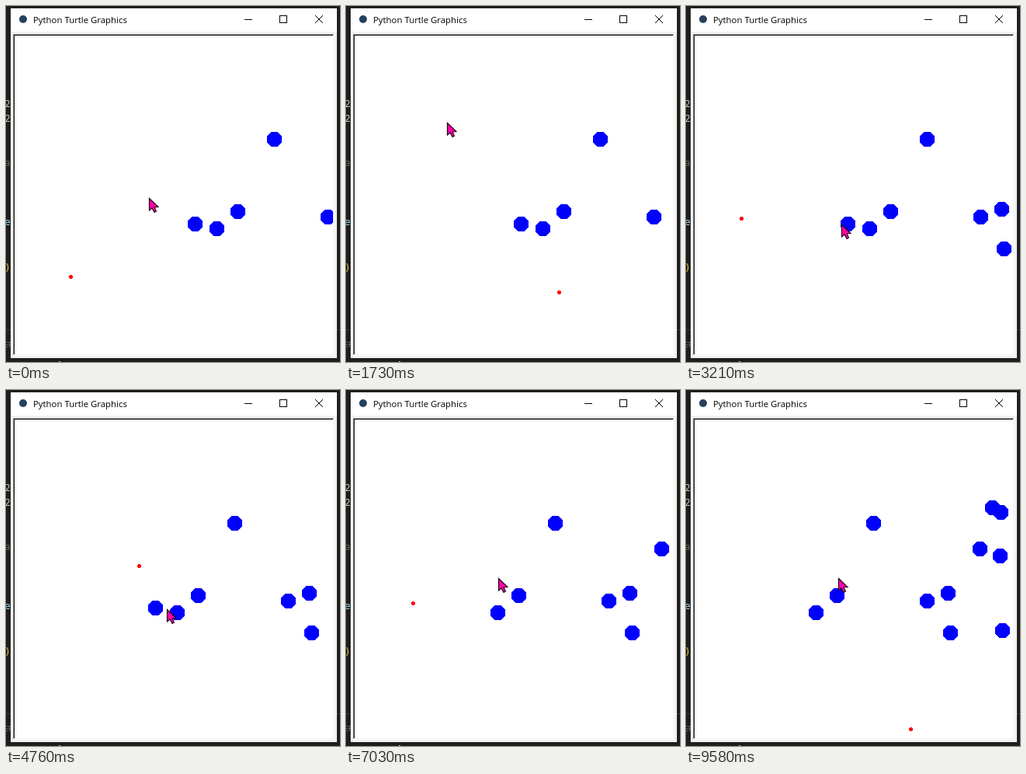
Recreate the animation shown at these times as an HTML page. Size 430 px wide and 458 px high, loop 9610 ms.

```html
<!DOCTYPE html>
<html lang="en">
<head>
<meta charset="utf-8">
<title>Cannon game</title>
<style>
  html, body { margin: 0; width: 100%; height: 100%; overflow: hidden; background: #1e1e1e; }
  svg { display: block; width: 430px; height: 458px; }
  .crisp { shape-rendering: crispEdges; }
  .code { font: 13px "Noto Sans Mono", monospace; }
  .panel { font: 9px "Open Sans", sans-serif; }
  .title { font: 11.4px "Open Sans", sans-serif; }
</style>
</head>
<body>
<svg viewBox="0 0 430 458">
  <defs>
    <clipPath id="field"><rect x="11" y="38" width="410" height="410"/></clipPath>
    <polygon id="target" points="-4,-9.5 4,-9.5 9.5,-4 9.5,4 4,9.5 -4,9.5 -9.5,4 -9.5,-4"
      transform="translate(.5 .5)" fill="#00f"/>
  </defs>

  <rect width="430" height="458" fill="#1e1e1e"/>
  <path d="M0 416.5H430" stroke="#3a3a3a"/>
  <path d="M68 457.5H70" stroke="#ccc"/>
  <g class="code">
    <text x="-2" y="130" fill="#b5cea8">2</text>
    <text x="-2" y="149" fill="#b5cea8">2</text>
    <text x="-2" y="206" fill="#5a7350">a</text>
    <text x="-2" y="282" fill="#9cdcfe">e</text>
    <text x="-2" y="340" fill="#e8c020">)</text>
  </g>
  <text class="panel" x="-2" y="439" fill="#858585">ER</text>

  <g class="crisp">
    <rect x="6" y="3" width="420" height="450" fill="#f0f0f0"/>
    <rect x="6" y="3" width="420" height="30" fill="#fff"/>
    <rect x="9" y="36" width="414" height="414" fill="#fff"/>
    <path d="M9.5 449V36.5H422" fill="none" stroke="#a0a0a0"/>
    <rect x="10" y="37" width="412" height="412" fill="#f0f0f0"/>
    <path d="M10.5 448V37.5H421" fill="none" stroke="#000"/>
    <rect x="11" y="38" width="410" height="410" fill="#fff"/>
  </g>

  <circle cx="22" cy="17" r="5" fill="#24405c"/>
  <text class="title" x="35" y="22">Python Turtle Graphics</text>
  <g fill="none" stroke="#000">
    <path class="crisp" d="M307 17.5H317M352.5 12.5H361.5V21.5H352.5Z"/>
    <path d="M398 12L408 22M408 12L398 22"/>
  </g>

  <g clip-path="url(#field)" class="crisp">
    <g id="targets"></g>
    <g id="ball">
      <path d="M-1-2H2V-1H3V2H2V3H-1V2H-2V-1H-1Z" fill="#f00"/>
    </g>
  </g>
  <polygon id="cursor" points="0.5,0.5 0.5,16 4,13 7,18.5 9.5,17 7,12 12,11.5"
    fill="#f0a" stroke="#200818" stroke-width="1.2"/>
</svg>

<script>
const LOOP = 9610;
const TICK = 46.06;      // ms
const DRIFT = 0.5;       // target movement per tick
const GRAVITY = 0.35;
const POWER = 25;        // click distance divided by launch speed
const HIT_RADIUS = 13;
const SPAWN_X = 418;
const CANNON = { x: 20, y: 450 };

// Centres when the loop starts; those beyond SPAWN_X drift in later.
const targets = [
  [345, 171], [243, 280], [271, 286], [298, 264], [414, 271], [441, 261],
  [444, 312], [482, 204], [498, 151], [509, 157], [508, 213], [511, 309]
].map(([x, y]) => ({ x, y, hit: Infinity }));

const clicks = [
  { t: -568, x: 147, y: 186 },
  { t: 2418, x: 94, y: 113 },
  { t: 6209, x: 112, y: 120.5 }
];

// The pointer eases through these places and the clicks.
const rests = [
  [0, 184, 247], [1730, 130, 150], [3210, 200, 281], [4760, 207, 282],
  [5500, 66, 96], [5970, 105, 130], [7000, 196, 242], [LOOP, 196, 242]
].map(([t, x, y]) => ({ t, x, y }));
const path = [...rests, ...clicks].sort((a, b) => a.t - b.t);

const byId = id => document.getElementById(id);
const targetX = (target, t) => target.x + 0.3 - DRIFT * t / TICK;

function ballAt(click, t) {
  const k = (t - click.t) / TICK;
  return {
    x: CANNON.x + (click.x - CANNON.x) / POWER * k,
    y: CANNON.y + (click.y - CANNON.y) / POWER * k + GRAVITY * k * (k + 1) / 2
  };
}

function findHits(click) {
  for (let t = click.t; ballAt(click, t).y <= CANNON.y; t += TICK) {
    const { x, y } = ballAt(click, t);
    for (const target of targets) {
      const distance = Math.hypot(targetX(target, t) - x, target.y - y);
      if (distance <= HIT_RADIUS) target.hit = Math.min(target.hit, t);
    }
  }
}

function place(el, x, y, visible = true) {
  el.setAttribute("visibility", visible ? "visible" : "hidden");
  el.setAttribute("transform", `translate(${Math.round(x)} ${Math.round(y)})`);
}

function draw(t) {
  for (const target of targets) {
    const x = targetX(target, t);
    place(target.dot, x, target.y, x <= SPAWN_X && t < target.hit);
  }

  const ball = ballAt(clicks.findLast(c => c.t <= t), t);
  place(byId("ball"), ball.x, ball.y, ball.y <= CANNON.y);

  const next = path.findIndex(p => p.t > t);
  const a = path[next - 1], b = path[next];
  const p = (t - a.t) / (b.t - a.t), ease = p * p * (3 - 2 * p);
  place(byId("cursor"), a.x + (b.x - a.x) * ease, a.y + (b.y - a.y) * ease);
}

for (const target of targets) {
  target.dot = document.createElementNS("http://www.w3.org/2000/svg", "use");
  target.dot.setAttribute("href", "#target");
  byId("targets").append(target.dot);
}
clicks.forEach(findHits);

const begin = performance.now();
function frame() {
  draw((performance.now() - begin) % LOOP);
  requestAnimationFrame(frame);
}
frame();
</script>
</body>
</html>
```
